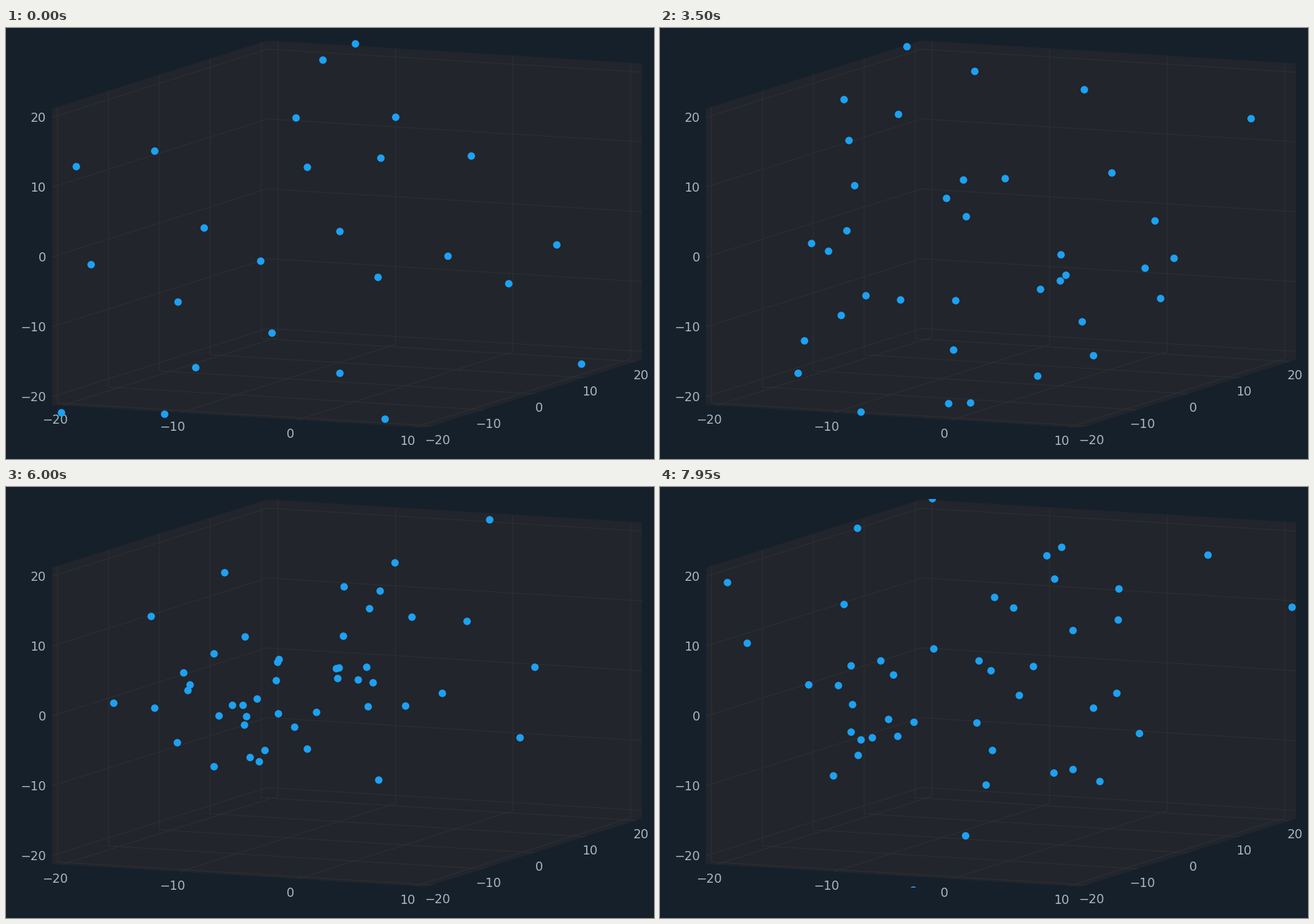
Write a matplotlib script that moves like this. It is 917x611 px and loops after 8 s.

```python
import numpy as np
import matplotlib.pyplot as plt
from matplotlib.animation import FuncAnimation
from matplotlib.patches import Polygon, Rectangle

W, H, DPI = 917, 611, 100
STEP, FRAMES = 50, 160
BACK, PANE, GRID, LABEL, DOT = "#15202b", "#22252b", "#2e3034", "#aab8c2", "#1da1f2"

fig = plt.figure(figsize=(W / DPI, H / DPI), dpi=DPI, facecolor=BACK)
ax = fig.add_axes([0, 0, 1, 1])
ax.set_xlim(0, W)
ax.set_ylim(H, 0)
ax.axis("off")

# The box: three panes spanned from the far bottom corner
corner = np.array([370, 437.5])
left = np.array([-304.5, 96.5])
right = np.array([529.5, 32.5])
up = np.array([0, -419.5])


def pane(a, b):
    pts = [corner, corner + a, corner + a + b, corner + b]
    ax.add_patch(Polygon(pts, closed=True, fc=PANE, ec=PANE, lw=0.6))


def bend(p, a, b):
    """Grid line that runs over two panes and folds at their shared edge."""
    ax.plot(*np.array([p + a, p, p + b]).T, color=GRID, lw=0.7)


def label(x, y, value, ha="center"):
    ax.text(x, y + 6.3, str(value).replace("-", "\u2212"), color=LABEL,
            size=12.5, family="DejaVu Sans", ha=ha, va="baseline")


for a, b in ((left, up), (right, up), (left, right)):
    pane(a, b)

for i, value in enumerate(range(-20, 21, 10)):
    bend(corner + up * (11.5 + 99 * i) / 419.5, left, right)
    label(56.5, 523 - 99 * i, value, "right")
    bend(corner + left * (297 - 72 * i) / 304.5, up, right)
    label(610.5 + 72 * i, 584 - 23 * i, value)
    if value < 20:
        bend(corner + right * (15 + 166.3 * i) / 529.5, up, left)
        label(69.5 + 166.3 * i, 555 + 10 * i, value)

# A wide cloud swings through its centre: each dot follows its own ellipse,
# starting near the far end and passing close to the middle after 6 to 7 s.
COUNT = 49
CENTRE = np.array([425, 288])
FAR = np.array([330, 280])
NEAR = np.array([150, 88])

rng = np.random.default_rng(7)
k = np.arange(COUNT)
angle = k * np.pi * (3 - 5 ** 0.5) + rng.normal(0, 0.3, COUNT)
radius = np.sqrt(-2 * np.log(1 - (k + 0.5) / COUNT))
start = FAR * (radius * [np.cos(angle), np.sin(angle)]).T
side = NEAR * rng.normal(size=(COUNT, 2))
speed = rng.uniform(0.21, 0.29, (COUNT, 1))

dots = ax.scatter([], [], s=58, color=DOT, linewidths=0, zorder=5)
dots.set_clip_path(Rectangle((64, 17), 835, 550, transform=ax.transData))


def draw(frame):
    phase = speed * frame * STEP / 1000
    dots.set_offsets(CENTRE + start * np.cos(phase) + side * np.sin(phase))
    return [dots]


def reset():
    return draw(0)


anim = FuncAnimation(fig, draw, frames=FRAMES, init_func=reset,
                     interval=STEP, repeat=True, repeat_delay=0)
plt.show()
```
